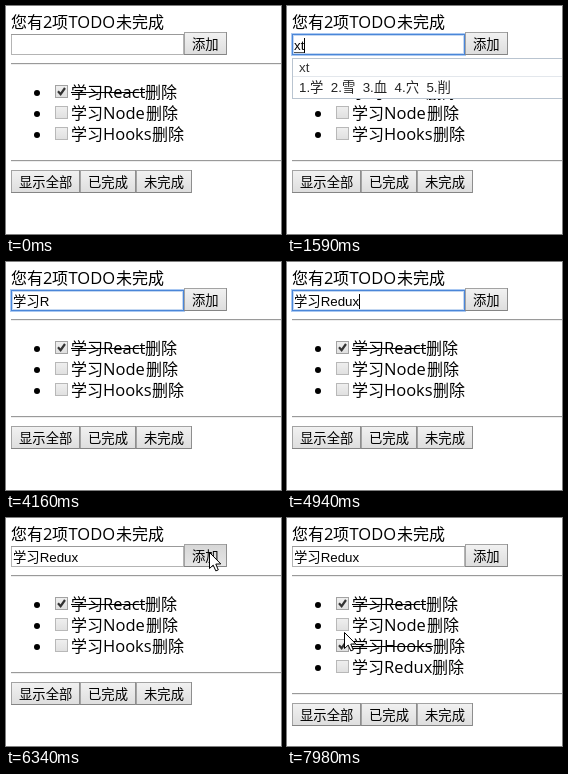
An HTML page with a canvas for the animation above (8 s loop, 275x228 px).

```html
<!DOCTYPE html>
<html lang="zh">
<head>
<meta charset="utf-8">
<title>TODO</title>
<style>
html, body { margin: 0; width: 100%; height: 100%; overflow: hidden; background: #fff; }
canvas { display: block; width: 275px; height: 228px; }
</style>
</head>
<body>
<canvas id="stage"></canvas>
<script>
const W = 275, H = 228, LOOP = 8000;
const canvas = document.getElementById('stage');
const ctx = canvas.getContext('2d');
const dpr = window.devicePixelRatio || 1;
canvas.width = W * dpr;
canvas.height = H * dpr;

const CJK = '"Noto Sans CJK SC", "Noto Sans CJK", sans-serif';
const HAN = '16px ' + CJK;
const LATIN = '16.5px "Open Sans", "Noto Sans", sans-serif';
const FIELD = '13.333px "Liberation Sans", ' + CJK;

const ADDED = 6410, CHECKED = 7740, FOCUS = 530, BLUR = 6340;

// [time, value]: each value holds until the next entry
const typed = [
  [0, ''], [1510, 'x'], [1590, 'xt'], [1770, 'xtx'], [1910, 'xtxi'],
  [2070, '学习'], [2460, '学习 '], [3530, '学习'], [3620, '学习R'],
  [4310, '学习Re'], [4540, '学习Red'], [4790, '学习Redu'], [4940, '学习Redux']
];
const caretOn = [
  [0, false], [530, true], [1060, false], [1510, true], [3000, false],
  [3530, true], [4160, false], [4310, true], [5490, false], [6020, true], [BLUR, false]
];
const pointer = [
  [0, null],
  [70, ['beam', 119, 69]], [120, ['beam', 100, 46]], [270, ['beam', 100, 42]],
  [430, ['beam', 100, 47]], [750, null],
  [5790, ['arrow', 264, 32]], [5860, ['arrow', 250, 33]], [5930, ['arrow', 238, 34]],
  [6020, ['arrow', 223, 34]], [6100, ['arrow', 209, 34]], [6190, ['arrow', 203, 34]],
  [6560, ['arrow', 216, 45]], [6630, ['arrow', 232, 65]], [6710, ['arrow', 218, 83]],
  [6880, ['arrow', 160, 103]], [6970, ['beam', 102, 120]], [7050, ['beam', 76, 132]],
  [7120, ['arrow', 62, 135]], [7190, ['arrow', 58, 135]], [7260, ['arrow', 56, 135]],
  [7510, ['arrow', 56, 131]], [7590, ['arrow', 56, 128]],
  [7820, ['arrow', 56, 124]], [7900, ['arrow', 57, 118]], [7980, ['arrow', 57, 114]]
];
const candidates = {
  x: '1.下  2.想  3.小  4.学  5.些',
  xt: '1.学  2.雪  3.血  4.穴  5.削',
  xtx: '1.学校  2.学习  3.学些  4.学',
  xtxi: '1.学习  2.学系  3.学  4.雪'
};

function at(track, t) {
  let value = track[0][1];
  for (const [start, v] of track) if (t >= start) value = v;
  return value;
}

function rect(x, y, w, h, color) {
  ctx.fillStyle = color;
  ctx.fillRect(x, y, w, h);
}

function frame(x, y, w, h, color) {
  ctx.strokeStyle = color;
  ctx.lineWidth = 1;
  ctx.strokeRect(x + .5, y + .5, w - 1, h - 1);
}

function text(str, x, y, font, color = '#000') {
  ctx.font = font;
  ctx.fillStyle = color;
  ctx.fillText(str, x, y);
}

function shade(y, h, top, bottom) {
  const g = ctx.createLinearGradient(0, y, 0, y + h);
  g.addColorStop(0, top);
  g.addColorStop(1, bottom);
  return g;
}

function rule(y) {
  rect(5, y, W - 5, 1, '#9a9a9a');
  rect(5, y + 1, W - 5, 1, '#eee');
}

function button(label, x, y, w, state) {
  const [top, bottom] = state === 'down' ? ['#d6d6d6', '#e6e6e6']
    : state === 'hover' ? ['#f6f6f6', '#e4e4e4'] : ['#f2f2f2', '#dddddd'];
  rect(x, y, w, 23, shade(y, 23, top, bottom));
  frame(x, y, w, 23, '#a3a3a3');
  rect(x, y + 22, w, 1, '#858585');
  rect(x + w - 1, y, 1, 23, '#8e8e8e');
  text(label, x + 8, y + 17, FIELD);
}

function checkbox(y, on) {
  rect(49, y, 13, 13, shade(y, 13, '#f0f0f0', '#dfdfdf'));
  frame(49, y, 13, 13, on ? '#a2a2a2' : '#b8b8b8');
  if (!on) return;
  ctx.strokeStyle = '#333';
  ctx.lineWidth = 2.2;
  ctx.beginPath();
  ctx.moveTo(52, y + 6.3);
  ctx.lineTo(54.6, y + 9.2);
  ctx.lineTo(59, y + 3);
  ctx.stroke();
}

function item(row, name, end, done) {
  const y = 86 + row * 21;
  ctx.fillStyle = '#000';
  ctx.beginPath();
  ctx.arc(31, y + 1, 3, 0, Math.PI * 2);
  ctx.fill();
  checkbox(y - 7, done);
  text('学习', 65, y + 6, HAN);
  text(name, 97, y + 6, LATIN);
  text('删除', end, y + 6, HAN);
  if (done) rect(65, y, end - 65, 1, '#000');
}

function field(t) {
  const focused = t >= FOCUS && t < BLUR;
  rect(5, 28, 173, 21, '#fff');
  if (focused) {
    frame(4, 27, 175, 23, '#a9c8f2');
    frame(5, 28, 173, 21, '#4a86d8');
    frame(6, 29, 171, 19, '#c3d7f1');
  } else {
    frame(5, 28, 173, 21, '#b4b4b4');
    rect(5, 28, 173, 1, '#999');
  }
  const value = at(typed, t);
  const composing = candidates[value];
  text(value, 7, 44, FIELD);
  const end = 7 + ctx.measureText(value).width;
  if (composing) rect(7, 46, end - 7, 1, '#555');
  if (at(caretOn, t)) rect(Math.round(end), 32, 1, 15, '#000');
}

function imePopup(value) {
  rect(5, 52, W, 41, '#fff');
  frame(5, 52, W + 10, 41, '#b9c4d0');
  text(value, 12, 66, FIELD, '#333');
  rect(6, 70, W, 1, '#e3e7ec');
  text(candidates[value], 12, 86, FIELD, '#222');
}

function arrow(x, y) {
  const pts = [[0, 0], [0, 16], [3.7, 12.6], [6.3, 18.4], [8.8, 17.4], [6.3, 11.6], [11.3, 11.4]];
  ctx.beginPath();
  for (const [px, py] of pts) ctx.lineTo(x + px + .5, y + py + .5);
  ctx.closePath();
  ctx.fillStyle = '#fff';
  ctx.fill();
  ctx.strokeStyle = '#000';
  ctx.lineWidth = 1;
  ctx.stroke();
}

function beam(x, y) {
  rect(x, y - 8, 1, 17, '#000');
  for (const end of [-9, 8]) {
    rect(x - 3, y + end, 3, 1, '#000');
    rect(x + 1, y + end, 3, 1, '#000');
  }
}

function draw(t) {
  ctx.setTransform(dpr, 0, 0, dpr, 0, 0);
  rect(0, 0, W, H, '#fff');
  const added = t >= ADDED, checked = t >= CHECKED;

  text('您有', 5, 22, HAN);
  text(added && !checked ? '3' : '2', 37, 22, LATIN);
  text('项', 46, 22, HAN);
  text('TODO', 62.5, 22, LATIN);
  text('未完成', 110, 22, HAN);

  field(t);
  const state = t >= BLUR && t < ADDED ? 'down' : t >= 6100 && t < 6560 ? 'hover' : '';
  button('添加', 178, 26, 43, state);
  rule(57);

  item(0, 'React', 139, true);
  item(1, 'Node', 140, false);
  item(2, 'Hooks', 146, checked);
  if (added) item(3, 'Redux', 145, false);

  const shift = added ? 21 : 0;
  rule(154 + shift);
  button('显示全部', 5, 164 + shift, 69);
  button('已完成', 74, 164 + shift, 56);
  button('未完成', 130, 164 + shift, 56);

  const value = at(typed, t);
  if (candidates[value]) imePopup(value);

  const p = at(pointer, t);
  if (p) (p[0] === 'arrow' ? arrow : beam)(p[1], p[2]);
}

const start = performance.now();
function tick() {
  draw((performance.now() - start) % LOOP);
  requestAnimationFrame(tick);
}
tick();
</script>
</body>
</html>
```
